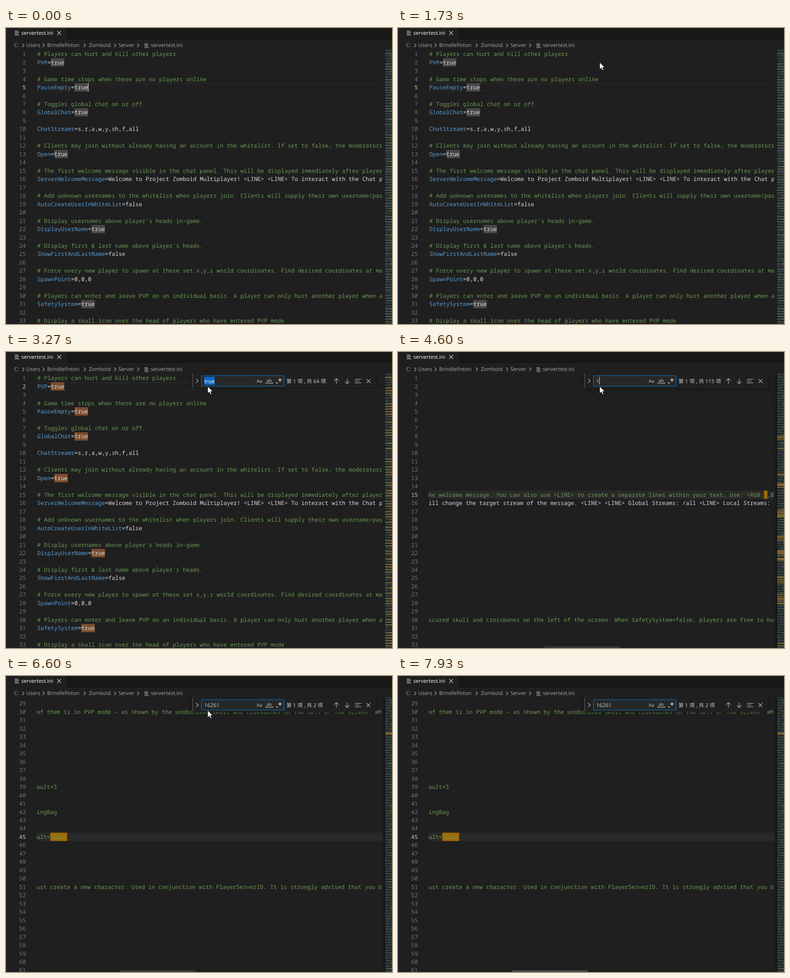
Animation of 853x656 px, one loop 8 s. Source, as an HTML page with a canvas:

```html
<!DOCTYPE html>
<html lang="zh-CN">
<head>
<meta charset="utf-8">
<title>Editor search</title>
<style>
html, body { margin: 0; width: 100%; height: 100%; overflow: hidden; background: #1f1f1f; }
canvas { display: block; }
</style>
</head>
<body>
<canvas id="stage" width="853" height="656"></canvas>
<script>
const W = 853, H = 656, LOOP = 8000;
const ctx = document.getElementById('stage').getContext('2d');
ctx.textRendering = 'geometricPrecision';

const CODE = '12.475px "Noto Sans Mono", "DejaVu Sans Mono", monospace';
const ui = size => `${size}px "Open Sans", "Noto Sans", "Noto Sans CJK SC", "Noto Sans CJK", sans-serif`;
const CHAR = 7.485, LINE = 18.47, LEFT = 69, RIGHT = 831;

const LINES = `# Players can hurt and kill other players
PVP=true

# Game time stops when there are no players online
PauseEmpty=true

# Toggles global chat on or off.
GlobalChat=true

ChatStreams=s,r,a,w,y,sh,f,all

# Clients may join without already having an account in the whitelist. If set to false, the moderators must add each one.
Open=true

# The first welcome message visible in the chat panel. This will be displayed immediately after player login. You can use RGB colours to change the colour of the welcome message. You can also use <LINE> to create a separate lines within your text. Use: <RGB:1,0,0> for red text.
ServerWelcomeMessage=Welcome to Project Zomboid Multiplayer! <LINE> <LINE> To interact with the Chat panel: press Tab, T, or Enter. <LINE> <LINE> The Tab key will change the target stream of the message. <LINE> <LINE> Global Streams: /all <LINE> Local Streams: /say, /yell

# Add unknown usernames to the whitelist when players join. Clients will supply their own username/password on joining.
AutoCreateUserInWhiteList=false

# Display usernames above player's heads in-game.
DisplayUserName=true

# Display first & last name above player's heads.
ShowFirstAndLastName=false

# Force every new player to spawn at these set x,y,z world coordinates. Find desired coordinates at map view.
SpawnPoint=0,0,0

# Players can enter and leave PVP on an individual basis. A player can only hurt another player when at least one of them is in PVP mode - as shown by the unobscured skull and crossbones on the left of the screen. When SafetySystem=false, players are free to hurt each other at any time.
SafetySystem=true

# Display a skull icon over the head of players who have entered PVP mode`.split('\n');

// Comment tails further down the file, visible only when scrolled right
const TAIL_COL = 114;
const tail = (n, text) => { LINES[n - 1] = '#' + ' '.repeat(TAIL_COL - 1) + text; };
tail(39, 'ault=3');
tail(42, 'ingBag');
tail(45, 'ult=16261');
tail(51, 'ust create a new character. Used in conjunction with PlayerServerID. It is strongly advised that you back up');

const TYPED = [[3270, 'true', 64], [4600, '1', 115], [5070, '16', 6], [5400, '162', 4], [5730, '1626', 4], [6070, '16261', 2]];
const MOVE_IN = [[757, 303], [655, 235], [535, 140], [460, 87], [445.8, 76.2]];
const MOVE_OUT = [[445.8, 76.2], [620, 160], [785, 390], [600, 590], [345, 653]];

const rnd = n => { const s = Math.sin(n * 127.1 + 11.7) * 43758.5453; return s - Math.floor(s); };
const within = (t, a, b) => t >= a && t < b;

function rect(x, y, w, h, color) {
  ctx.fillStyle = color;
  ctx.fillRect(x, y, w, h);
}

function text(str, x, y, color, font) {
  ctx.font = font;
  ctx.fillStyle = color;
  ctx.fillText(str, x, y);
}

function path(points, color, width = 1.1) {
  ctx.beginPath();
  points.forEach(([x, y]) => ctx.lineTo(x, y));
  ctx.strokeStyle = color;
  ctx.lineWidth = width;
  ctx.stroke();
}

function cross(x, y, r, color) {
  path([[x - r, y - r], [x + r, y + r]], color);
  path([[x + r, y - r], [x - r, y + r]], color);
}

function along(points, p) {
  const k = Math.min(Math.max(p, 0), 1) * (points.length - 1);
  const i = Math.min(Math.floor(k), points.length - 2), f = k - i;
  return points[i].map((v, n) => v + (points[i + 1][n] - v) * f);
}

function stateAt(t) {
  const find = TYPED.filter(e => t >= e[0]).pop();
  const s = {
    find: find && find[1], count: find && find[2],
    active: t < 2000 ? 5 : t < 4600 ? 2 : t < 5070 ? 15 : 45,
    top: 48.5, first: 1, col: 0, shift: 0, matchCol: -1,
    marks: !within(t, 2070, 2130),
    editCaret: t < 530 || within(t, 1000, 1530) || within(t, 2000, 2530) || within(t, 3070, 3270),
    findCaret: within(t, 4600, 6600) || within(t, 7130, 7670)
  };
  if (t >= 5070) Object.assign(s, { top: 51.7, first: 29, col: TAIL_COL, shift: 8, bar: 253, matchCol: 118 });
  else if (t >= 4600) Object.assign(s, { col: 159, bar: 324, matchCol: 258 });
  s.scroll = s.col ? s.col * CHAR + 1.1 : 0;
  s.barColor = t < 7870 ? '#383838' : t < 7930 ? '#414141' : '#4a4b4c';
  return s;
}

function fileIcon(x, y, color) {
  [7, 9.5, 7, 9.5].forEach((w, i) => rect(x, y + i * 2.9, w, 1.1, color));
}

function chevron(x, y, color, r = 4) {
  path([[x - r / 2, y - r], [x + r / 2, y], [x - r / 2, y + r]], color);
}

function drawHeader() {
  rect(0, 0, W, 27, '#181818');
  rect(131, 26, W - 131, 1, '#2b2b2b');
  rect(2, 0, 129, 27, '#1f1f1f');
  rect(131, 0, 1, 27, '#2b2b2b');
  fileIcon(19.5, 6, '#d4d7d6');
  text('servertest.ini', 34, 15, '#ffffff', ui(11.6));
  cross(117.5, 11, 4.3, '#e6e6e6');

  const grey = '#a9a9a9';
  [['C:', 18], ['Users', 45], ['Brindlefinton', 91], ['Zomboid', 183], ['Server', 248.5], ['servertest.ini', 320]]
    .forEach(([s, x]) => text(s, x, 42.3, grey, ui(11.6)));
  [38, 83, 174, 241, 292].forEach(x => chevron(x, 38.5, grey));
  fileIcon(306, 34, '#c0c3c2');
}

function drawCode(s) {
  const lineTop = n => s.top + (n - s.first) * LINE;
  const colX = c => LEFT - s.scroll + c * CHAR;
  const y = lineTop(s.active);

  ctx.save();
  ctx.beginPath();
  ctx.rect(0, 48, RIGHT, H - 48);
  ctx.clip();
  for (let n = s.first; lineTop(n) < H; n++) {
    ctx.textAlign = 'right';
    text(n, 44, lineTop(n) + 13.7, n === s.active ? '#cccccc' : '#6e7681', CODE);
  }
  ctx.textAlign = 'left';

  ctx.beginPath();
  ctx.rect(68, 48, RIGHT - 68, H - 48);
  ctx.clip();
  if (s.matchCol >= 0) {
    rect(68, y, RIGHT - 68, LINE, '#292929');
    rect(colX(s.matchCol), y, s.find.length * CHAR, LINE, '#9e6a03');
  } else {
    rect(68, Math.round(y), RIGHT - 68, 1.5, '#2a2a2a');
    rect(68, Math.round(y + LINE) - 1.5, RIGHT - 68, 1.5, '#2a2a2a');
  }
  for (let n = s.first; lineTop(n) < H; n++) {
    const str = LINES[n - 1] || '', base = lineTop(n) + 13.7;
    if (str[0] === '#') { text(str, colX(0), base, '#6a9955', CODE); continue; }
    const eq = str.indexOf('=');
    if (eq < 0) continue;
    const value = str.slice(eq);
    if (value === '=true' && s.marks && !s.col) {
      rect(colX(eq + 1), lineTop(n), 4 * CHAR, LINE, s.find ? '#7d4e2f' : '#484848');
    }
    text(str.slice(0, eq), colX(0), base, '#569cd6', CODE);
    text(value, colX(eq), base, '#d8d8d8', CODE);
  }
  if (s.editCaret) rect(colX(LINES[s.active - 1].length) - 0.6, y, 1.9, LINE, '#aeafad');
  ctx.restore();

  if (s.bar) rect(s.bar, 652, 166, 4, s.barColor);
  if (s.first > 1) {
    const g = ctx.createLinearGradient(0, 48, 0, 52);
    g.addColorStop(0, 'rgba(0,0,0,.2)');
    g.addColorStop(1, 'rgba(0,0,0,0)');
    rect(18, 48, RIGHT - 18, 4, g);
  }
}

function minimapMark(s, i, isKey) {
  if (!s.find) return isKey && s.marks && rnd(i) < 0.55 ? 'rgba(110,110,110,.45)' : null;
  if (s.find === 'true') return isKey && rnd(i) < 0.55 ? 'rgba(209,134,22,.6)' : null;
  if (s.find === '1') {
    const dense = i > 30 && rnd(Math.floor(i / 6) + 500) < 0.3;
    return dense && rnd(i) < 0.5 ? 'rgba(190,120,16,.65)' : null;
  }
  const last = s.find === '16' ? 48 : s.find === '16261' ? 46 : 47;
  return i >= 45 && i <= last ? 'rgba(200,130,16,.7)' : null;
}

function drawMinimap(s) {
  const pitch = 1.944;
  ctx.save();
  ctx.beginPath();
  ctx.rect(832, 48, W - 832, H - 48);
  ctx.clip();
  if (s.col) {
    const g = ctx.createLinearGradient(831, 0, 838, 0);
    g.addColorStop(0, 'rgba(0,0,0,0)');
    g.addColorStop(1, 'rgba(0,0,0,.35)');
    rect(831, 48, 7, H - 48, g);
  }
  for (let i = 1; i < 330; i++) {
    const y = 48 + (i - 1) * pitch - s.shift, kind = i % 3;
    const mark = minimapMark(s, i, kind === 2);
    if (mark) rect(838, y, 15, pitch, mark);
    if (!kind) continue;
    const name = 7 + Math.floor(rnd(i + 90) * 16);
    for (let c = 0; c < 15; c++) {
      const r = rnd(i * 17 + c);
      if (r < 0.12) continue;
      const rgb = kind === 1 ? '106,153,85' : c < name ? '86,156,214' : '204,204,204';
      rect(838 + c, y, 1, 1.5, `rgba(${rgb},${(0.2 + r * 0.34).toFixed(2)})`);
    }
  }
  ctx.restore();
}

function drawFind(s) {
  const ink = '#cccccc';
  ctx.save();
  ctx.beginPath();
  ctx.rect(390, 48, W - 390, 60);
  ctx.clip();
  ctx.shadowColor = 'rgba(0,0,0,.45)';
  ctx.shadowBlur = 8;
  ctx.beginPath();
  ctx.roundRect(411, 44, 406, 36, 4);
  ctx.fillStyle = '#202020';
  ctx.fill();
  ctx.restore();
  rect(411, 48, 2.5, 31, '#3f3f3f');
  chevron(422.5, 64.3, ink, 4.5);

  ctx.beginPath();
  ctx.roundRect(432, 52.5, 182.5, 23, 2);
  ctx.fillStyle = '#272727';
  ctx.fill();
  ctx.strokeStyle = '#0078d4';
  ctx.lineWidth = 1.2;
  ctx.stroke();

  const font = ui(11.9);
  ctx.font = font;
  const w = ctx.measureText(s.find).width;
  const selected = s.find === 'true';
  if (selected) rect(438, 55, w, 18, '#0a66c8');
  text(s.find, 438, 68.6, selected ? '#ffffff' : ink, font);
  if (s.findCaret) rect(438 + w, 55, 1, 17, '#e0e0e0');

  text('Aa', 554, 68, ink, ui(10.3));
  text('ab', 575.5, 67, ink, ui(10.3));
  path([[574, 67], [574, 69.5], [589.5, 69.5], [589.5, 67]], ink, 1);
  rect(597.5, 67, 2.6, 2.6, ink);
  for (let k = 0; k < 3; k++) {
    const a = Math.PI * (k / 3 + 0.5), dx = 4 * Math.cos(a), dy = 4 * Math.sin(a);
    path([[605.5 - dx, 62 - dy], [605.5 + dx, 62 + dy]], ink, 1.2);
  }

  text(`第 1 项 , 共 ${s.count} 项`, 619.5, 68.6, ink, ui(11.67));
  [[730, -1], [754, 1]].forEach(([x, d]) => {
    path([[x, 64.5 - 5.5 * d], [x, 64.5 + 5.5 * d]], ink);
    path([[x - 5, 64.5 + 0.8 * d], [x, 64.5 + 5.8 * d], [x + 5, 64.5 + 0.8 * d]], ink);
  });
  [[60, 14], [64, 10], [68, 14]].forEach(([y, len]) => rect(771, y, len, 1, ink));
  cross(801, 64.5, 4.2, ink);
}

function drawMouse(t) {
  const step = Math.floor((t + 5) * 0.015);
  if (step < 15) return;
  let [x, y] = step < 102 ? along(MOVE_IN, (step - 15) / 11) : along(MOVE_OUT, (step - 101) / 13);
  if (step > 114) [x, y] = along([[345, 653], [319.5, 654.2]], (step - 114) / 2);
  ctx.beginPath();
  [[0, 0], [0, 15.5], [3.6, 12.2], [6.2, 17.8], [8.7, 16.7], [6.2, 11.3], [10.9, 11]]
    .forEach(([dx, dy]) => ctx.lineTo(x + dx, y + dy));
  ctx.closePath();
  ctx.fillStyle = '#ffffff';
  ctx.fill();
  ctx.strokeStyle = '#000000';
  ctx.lineWidth = 0.8;
  ctx.stroke();
}

function draw(t) {
  const s = stateAt(t);
  rect(0, 0, W, H, '#1f1f1f');
  drawHeader();
  drawCode(s);
  drawMinimap(s);
  if (s.find) drawFind(s);
  rect(0, 0, 1, H, '#181818');
  rect(1, 0, 1, H, '#2b2b2b');
  drawMouse(t);
}

function tick() {
  draw(performance.now() % LOOP);
  requestAnimationFrame(tick);
}
tick();
</script>
</body>
</html>
```
